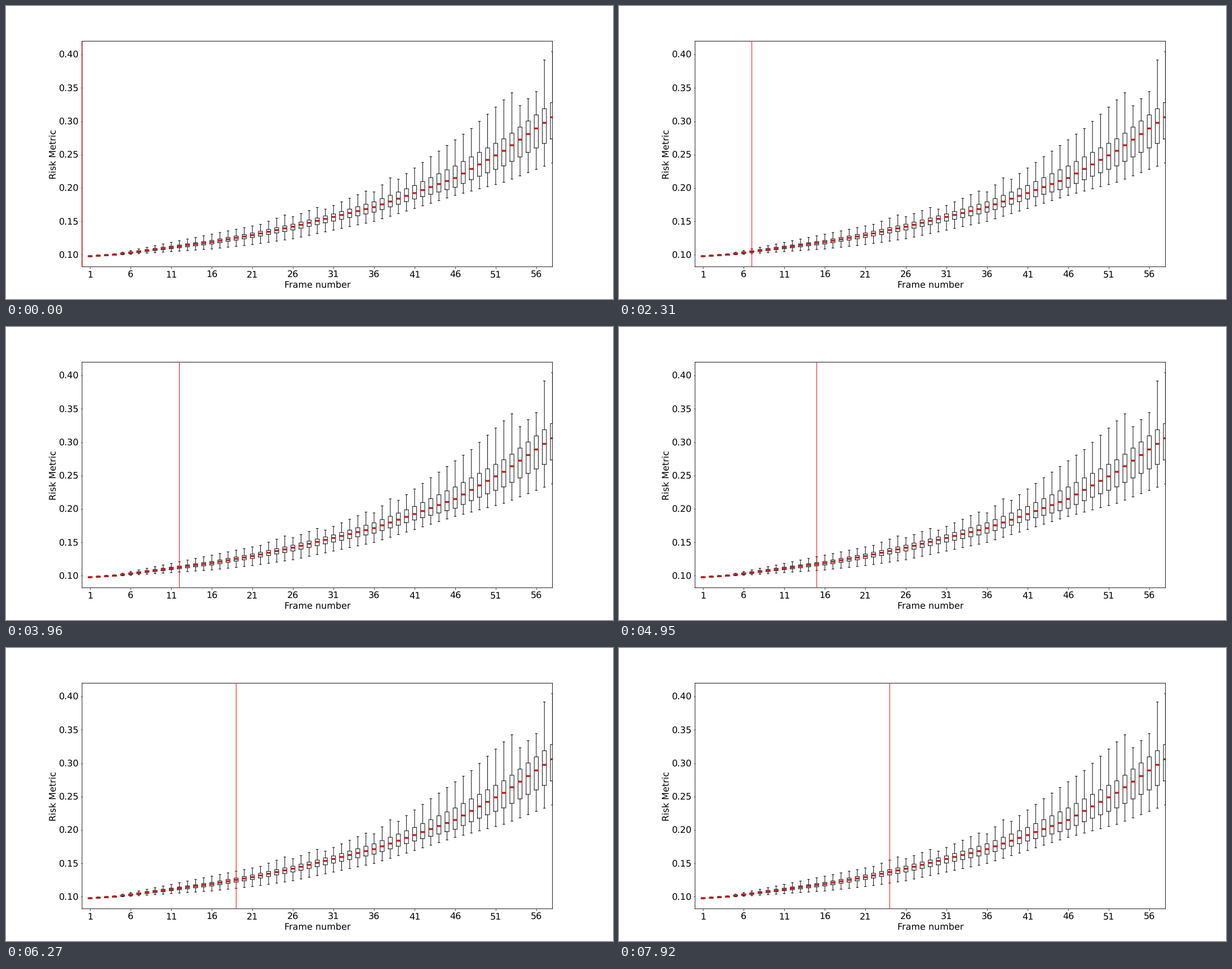
These frames come from a looping animation (1077x520 px, 8 s). A matplotlib script:

```python
import numpy as np
import matplotlib.pyplot as plt
from matplotlib.animation import FuncAnimation
from matplotlib.collections import LineCollection

W, H = 1077, 520
LOOP, INTERVAL, STEP = 8000, 40, 330  # ms
COUNT = 58

plt.rcParams.update({"font.family": "DejaVu Sans", "font.size": 16,
                     "text.hinting": "none"})

fig = plt.figure(figsize=(W / 72, H / 72), dpi=72, facecolor="white")
ax = fig.add_axes([0.1253, 0.11, 0.775, 0.77])
ax.set_xlim(0, COUNT)
ax.set_ylim(0.082, 0.42)
ax.set_xticks(range(1, COUNT, 5))
ax.set_yticks(np.arange(0.10, 0.41, 0.05))
ax.yaxis.set_major_formatter("{x:.2f}")
ax.tick_params(axis="x", length=2.5, pad=4.2, width=0.8)
ax.tick_params(axis="y", length=2.5, pad=2.5, width=0.8)
ax.set_xlabel("Frame number", labelpad=2.6)
ax.set_ylabel("Risk Metric", labelpad=2.2)
for spine in ax.spines.values():
    spine.set(linewidth=0.9, snap=False)

xs = np.arange(1, COUNT + 1)


def curve(*points):
    """Straight lines through (box number, thousandths) key points."""
    x, y = zip(*points)
    return np.interp(xs, x, y) / 1000


median = curve((1, 97.9), (4, 100.2), (16, 119), (21, 129.4), (26, 142),
               (36, 171.3), (41, 192.4), (46, 215), (52, 255.7), (58, 306))
q1 = median - curve((1, 0.6), (21, 3.5), (41, 8.8), (48, 16), (58, 32.5))
q3 = median + curve((1, 0.4), (31, 4.5), (41, 11.4), (46, 18), (53, 18),
                    (58, 22))
low = median - curve((1, 0.9), (4, 1), (26, 18), (41, 23), (46, 26),
                     (58, 68.4))
high = curve((1, 98.7), (4, 101.3), (17, 133.3), (22, 145.6), (25, 159.5),
             (26, 157), (29, 170.9), (30, 168.4), (35, 195.4), (36, 194.1),
             (38, 215.2), (39, 213.1), (48, 289.1), (53, 342.7),
             (54, 323.3), (56, 344.4), (57, 391.7), (58, 404.3))


def add_lines(segments, **style):
    ax.add_collection(LineCollection(segments, snap=False, **style),
                      autolim=False)


def level(x, y, half):
    return [(x - half, y), (x + half, y)]


outlines, medians = [], []
for x, lo, a, m, b, hi in zip(xs, low, q1, median, q3, high):
    l, r = x - 0.25, x + 0.25
    outlines += [[(l, a), (r, a), (r, b), (l, b), (l, a)],
                 [(x, a), (x, lo)], [(x, b), (x, hi)],
                 level(x, lo, 0.125), level(x, hi, 0.125)]
    medians.append(level(x, m, 0.28))

add_lines(outlines, colors="black", linewidths=0.95, capstyle="projecting",
          zorder=2)
add_lines(medians, colors="#bd2020", linewidths=3.3, zorder=2.1)

cursor = ax.axvline(0, color="red", lw=1, zorder=3, clip_on=False,
                    solid_capstyle="butt", snap=False)


def update(i):
    # Round up to the frame grid so a step is never late.
    x = (i * INTERVAL + 30) // STEP
    cursor.set_xdata([x, x])
    return cursor,


anim = FuncAnimation(fig, update, frames=LOOP // INTERVAL, interval=INTERVAL,
                     repeat=True, repeat_delay=0, blit=False)
plt.show()
```
